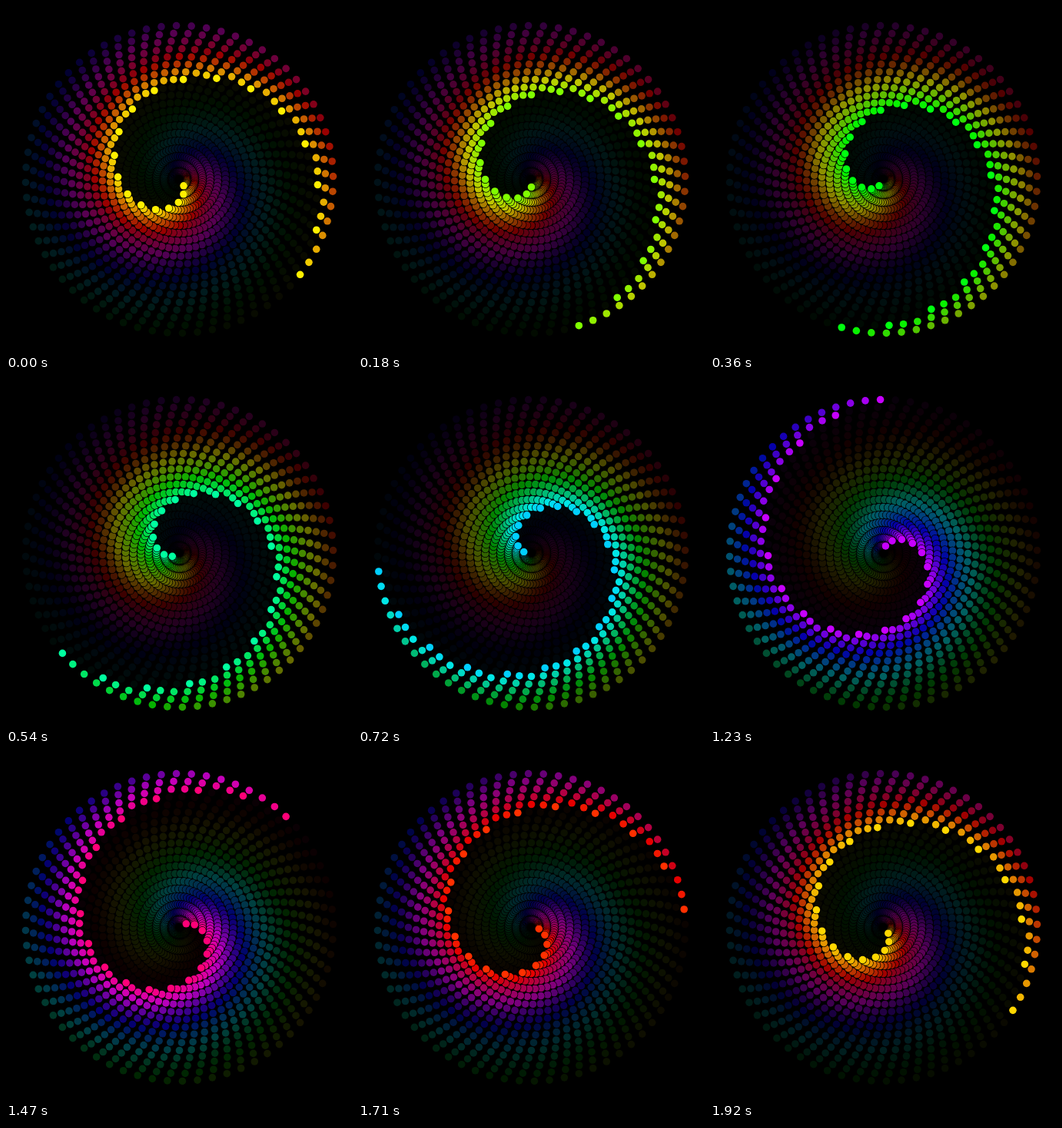
An HTML page with a canvas for the animation above (1.95 s loop, 450 by 450 pixels).

```html
<!DOCTYPE html>
<html lang="en">
<head>
<meta charset="utf-8">
<title>Spiral of dots</title>
<style>
html, body { margin: 0; width: 100%; height: 100%; overflow: hidden; background: #000; }
canvas { display: block; }
</style>
</head>
<body>
<canvas id="stage" width="450" height="450"></canvas>
<script>
const ctx = document.getElementById('stage').getContext('2d');
const CENTER = 225.5;
const RINGS = 20, GAP = 10, LAG = 18;
const STEP_MS = 30, STEPS = 65, TURN = 360 / 64;
const FIRST = 10;   // sweep step shown at time zero
const FADE = 0.95;  // brightness kept per step
const TAU = Math.PI * 2;

function dot(x, y, color) {
  ctx.fillStyle = '#000';
  ctx.beginPath();
  ctx.arc(x, y, 5.5, 0, TAU);
  ctx.fill();
  ctx.fillStyle = color;
  ctx.beginPath();
  ctx.arc(x, y, 4.8, 0, TAU);
  ctx.fill();
}

// One dot per ring, each ring trailing the next by LAG degrees.
function spiral(sweep, light) {
  const color = `hsl(${sweep % 360}, 100%, ${50 * light}%)`;
  for (let i = 1; i <= RINGS; i++) {
    const r = i * GAP;
    const a = (sweep - LAG * (RINGS + 1 - i)) * Math.PI / 180;
    dot(CENTER + r * Math.cos(a), CENTER + r * Math.sin(a), color);
  }
}

// The sweep runs from 0 to 360 inclusive, so it rests one step at the wrap.
function draw(step) {
  ctx.fillStyle = '#000';
  ctx.fillRect(0, 0, 450, 450);
  for (let age = STEPS - 1; age >= 0; age--) {
    const n = (step + FIRST - age + STEPS) % STEPS;
    spiral(n * TURN, Math.pow(FADE, age));
  }
}

const start = performance.now();
let shown = -1;

function tick() {
  const step = Math.floor((performance.now() - start) / STEP_MS) % STEPS;
  if (step !== shown) draw(shown = step);
  requestAnimationFrame(tick);
}
tick();
</script>
</body>
</html>
```
